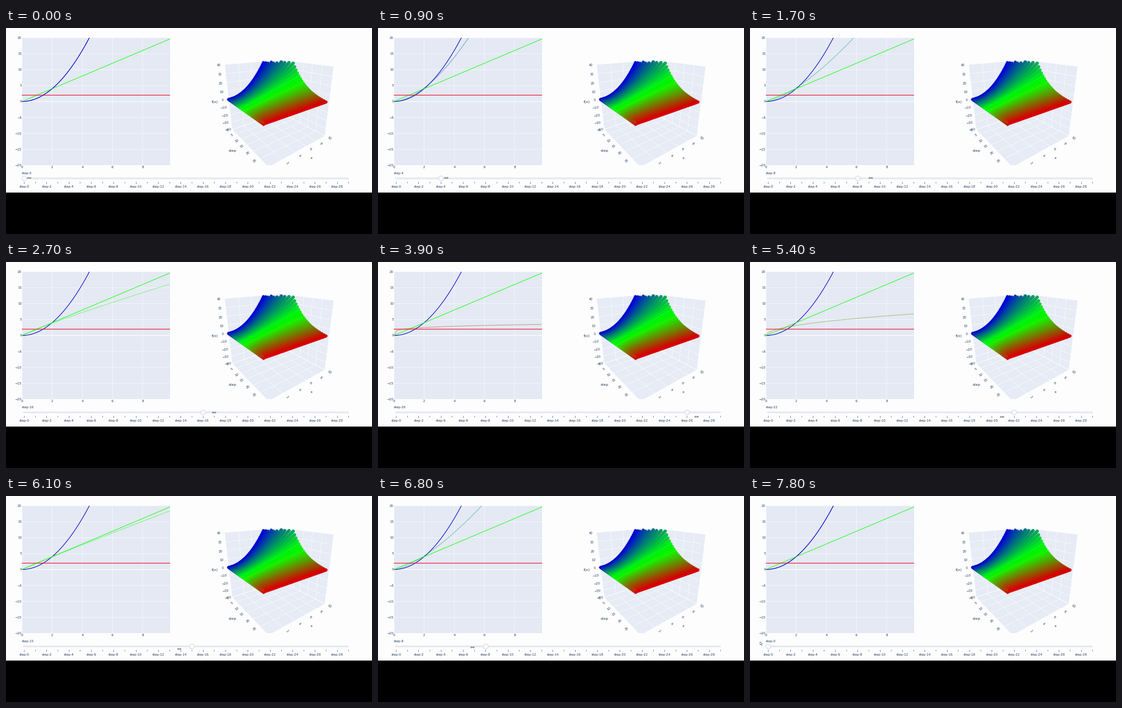
These frames come from a looping animation (600 by 338 pixels, 7900 ms). A matplotlib script:

```python
import math

import numpy as np
import matplotlib.pyplot as plt
from matplotlib.animation import FuncAnimation
from matplotlib.patches import Circle, FancyBboxPatch, Polygon, Rectangle

W, H, DPI = 600, 338, 100
PT = 72 / DPI
FRAMES, INTERVAL = 79, 100
INK, PANE, RAIL = "#2a3f5f", "#e4e9f4", "#c8d0de"
STEPS = 30

plt.rcParams["font.family"] = "DejaVu Sans"
fig = plt.figure(figsize=(W / DPI, H / DPI), dpi=DPI, facecolor="black")
ax = fig.add_axes([0, 0, 1, 1])
ax.set_xlim(0, W)
ax.set_ylim(H, 0)
ax.axis("off")
ax.add_patch(Rectangle((0, 0), W, 270, fc="#fdfdfe", lw=0))


def line(x, y, color, width, **kw):
    return ax.plot(x, y, color=color, lw=width * PT, snap=False, **kw)[0]


def label(x, y, text, size=5.3, ha="center", **kw):
    kw.setdefault("va", "center")
    return ax.text(x, y, text, fontsize=size * PT, color=INK, ha=ha, zorder=8, **kw)


def signed(v):
    return str(v).replace("-", "\u2212")


def derivative(x, k):
    """Fractional derivative of x^2, order 0 to 2 over all steps."""
    order = 2 * k / (STEPS - 1)
    return 2 / math.gamma(3 - order) * x ** (2 - order)


def step_color(k):
    s = 2 * k / (STEPS - 1) - 1
    green = min(1, 1.12 * (1 - abs(s)))
    return np.array([0.88 * max(s, 0), green, 0.88 * max(-s, 0)])


# Flat chart
X0, X1, Y0, Y1 = 26, 268.5, 16, 225.3
XMAX = 9.8


def px(x):
    return X0 + x * (X1 - X0) / XMAX


def py(y):
    return Y0 + (20 - y) * (Y1 - Y0) / 40


chart = Rectangle((X0, Y0), X1 - X0, Y1 - Y0, fc=PANE, lw=0)
ax.add_patch(chart)
for v in range(0, 10, 2):
    line([px(v)] * 2, [Y0, Y1], "white", 1 if v == 0 else 0.55)
    label(px(v), 228.8, str(v))
for v in range(-20, 21, 5):
    line([X0, X1], [py(v)] * 2, "white", 1 if v == 0 else 0.55)
    label(25.7, py(v) + 0.2, signed(v), ha="right")

xs = np.arange(50) * 0.2


def curve(y, color, width=1.0, **kw):
    ln = line(px(xs), py(y), color, width, **kw)
    ln.set_clip_path(chart)
    return ln


curve(xs ** 2, (0.04, 0.02, 0.75), zorder=3)
curve(2 * xs, (0.15, 1, 0.15), zorder=3)
curve(2 + 0 * xs, (0.95, 0, 0.08), zorder=3)
dotted = curve(xs ** 2, "b", zorder=4, linestyle=(0, (1.1, 1.3)))

# Perspective chart
CX, CY, FOCAL, DIST = 443.8, 120.9, 252.9, 2.165
TILT, TURN = math.radians(20.7), math.radians(37.5)


def project(u, v, w):
    """Unit cube (step, x, f) to pixels and depth."""
    near = u * math.cos(TURN) - v * math.sin(TURN)
    side = u * math.sin(TURN) + v * math.cos(TURN)
    depth = DIST - near * math.cos(TILT) - w * math.sin(TILT)
    drop = near * math.sin(TILT) - w * math.cos(TILT)
    return CX + FOCAL * side / depth, CY + FOCAL * drop / depth, depth


scene = Rectangle((322, 15), 244, Y1 - 15, fc="none", lw=0)
ax.add_patch(scene)


def path3d(*pts):
    return np.array([project(*p)[:2] for p in pts])


def pane(*pts):
    p = Polygon(path3d(*pts), fc="#e6ebf5", lw=0)
    ax.add_patch(p)
    p.set_clip_path(scene)


def grid3d(*pts):
    p = path3d(*pts)
    line(p[:, 0], p[:, 1], "white", 0.55).set_clip_path(scene)


h = 0.5
pane((-h, -h, -h), (h, -h, -h), (h, h, -h), (-h, h, -h))
pane((-h, -h, -h), (-h, h, -h), (-h, h, h), (-h, -h, h))
pane((-h, h, -h), (h, h, -h), (h, h, h), (-h, h, h))

OUT = 0.57
for s in range(0, 30, 5):
    u = s / 30 - h
    grid3d((u, -h, -h), (u, h, -h), (u, h, h))
    lx, ly, _ = project(u, -OUT, -h)
    label(lx, ly - 0.5, str(s), rotation=28)
for x in range(0, 11, 2):
    v = x / 10 - h
    grid3d((h, v, -h), (-h, v, -h), (-h, v, h))
    if x:
        lx, ly, _ = project(OUT, v, -h)
        label(lx + 1, ly + 0.8, str(x), rotation=-38)
for f in range(-40, 41, 10):
    w = f / 80
    grid3d((-h, -h, w), (-h, h, w), (h, h, w))
    lx, ly, _ = project(-h, -h, w)
    label(lx - (6.5 if f == -40 else 9.5), ly + 1, signed(f), rotation=6)
label(342, 121.8, "f(x)", 6.4)
label(371.8, 201, "step", 6.2)
label(500.5, 213.3, "x", 6.2)

dots = []
for k in range(STEPS):
    for x, f in zip(xs, derivative(xs, k)):
        if f <= 40:
            sx, sy, depth = project(k / 30 - h, x / 10 - h, f / 80)
            dots.append((depth, sx, sy, step_color(k)))
dots.sort(key=lambda d: -d[0])
_, sx, sy, colors = zip(*dots)
ax.scatter(sx, sy, s=(4.8 * PT) ** 2, c=colors, linewidths=0.4 * PT,
           edgecolors=np.array(colors) * 0.86, zorder=5)

# Slider
SX, GAP, SY = 30, 18.33, 246.8
ax.add_patch(FancyBboxPatch((28.5, SY - 0.9), 533, 1.8, fc="#f1f4f8", ec=RAIL,
                            lw=0.5 * PT, boxstyle="round,pad=0,rounding_size=0.9"))
for k in range(STEPS):
    x = SX + GAP * k
    major = k % 2 == 0
    line([x, x], [252.8, 255.6 if major else 254.6], "#444444", 0.6)
    if major:
        label(x, 260.5, f"step-{k}")
grip = Circle((SX, SY), 4, fc="#f8fafc", ec=RAIL, lw=0.7 * PT, zorder=6)
ax.add_patch(grip)
current = label(26, 238.2, "step-0", ha="left")

# Mouse: resize arrows on the slider, a pointer beside it
ARROWS = np.array([(-3.4, 0), (-1.6, -1.4), (-1.6, -0.3), (1.6, -0.3), (1.6, -1.4),
                   (3.4, 0), (1.6, 1.4), (1.6, 0.3), (-1.6, 0.3), (-1.6, 1.4)])
POINTER = np.array([(-1.6, -3), (2.4, 0.4), (0.6, 0.6), (1.6, 2.8),
                    (0.6, 3.2), (-0.3, 1.1), (-1.6, 2.2)])
mouse = Polygon(ARROWS, closed=True, fc="white", ec="#555555", lw=0.5 * PT, zorder=9)
ax.add_patch(mouse)

TIMES = [0, 0.4, 1.7, 2.7, 3.9, 4.3, 4.5, 4.8, 6.1, 7.4, 7.8]
MOUSE_X = [38, 58, 198, 341, 522, 563, 562, 524, 284, 44, 18]
MOUSE_Y = [246, 246, 246, 247, 254, 256, 257, 257, 251, 246, 242]
LAG = 0.15


def mouse_x(t):
    return np.interp(t, TIMES, MOUSE_X)


def update(i):
    t = i * INTERVAL / 1000
    k = int(np.clip(round((mouse_x(t - LAG) - SX) / GAP), 0, STEPS - 1))
    dotted.set_ydata(py(derivative(xs, k)))
    dotted.set_color(step_color(k))
    grip.center = (SX + GAP * k, SY)
    current.set_text(f"step-{k}")
    x = mouse_x(t)
    shape = POINTER if x < 25 else ARROWS
    mouse.set_xy(shape + (x, np.interp(t, TIMES, MOUSE_Y)))
    return dotted, grip, current, mouse


anim = FuncAnimation(fig, update, frames=FRAMES, interval=INTERVAL,
                     repeat=True, repeat_delay=0, blit=False)
plt.show()
```
